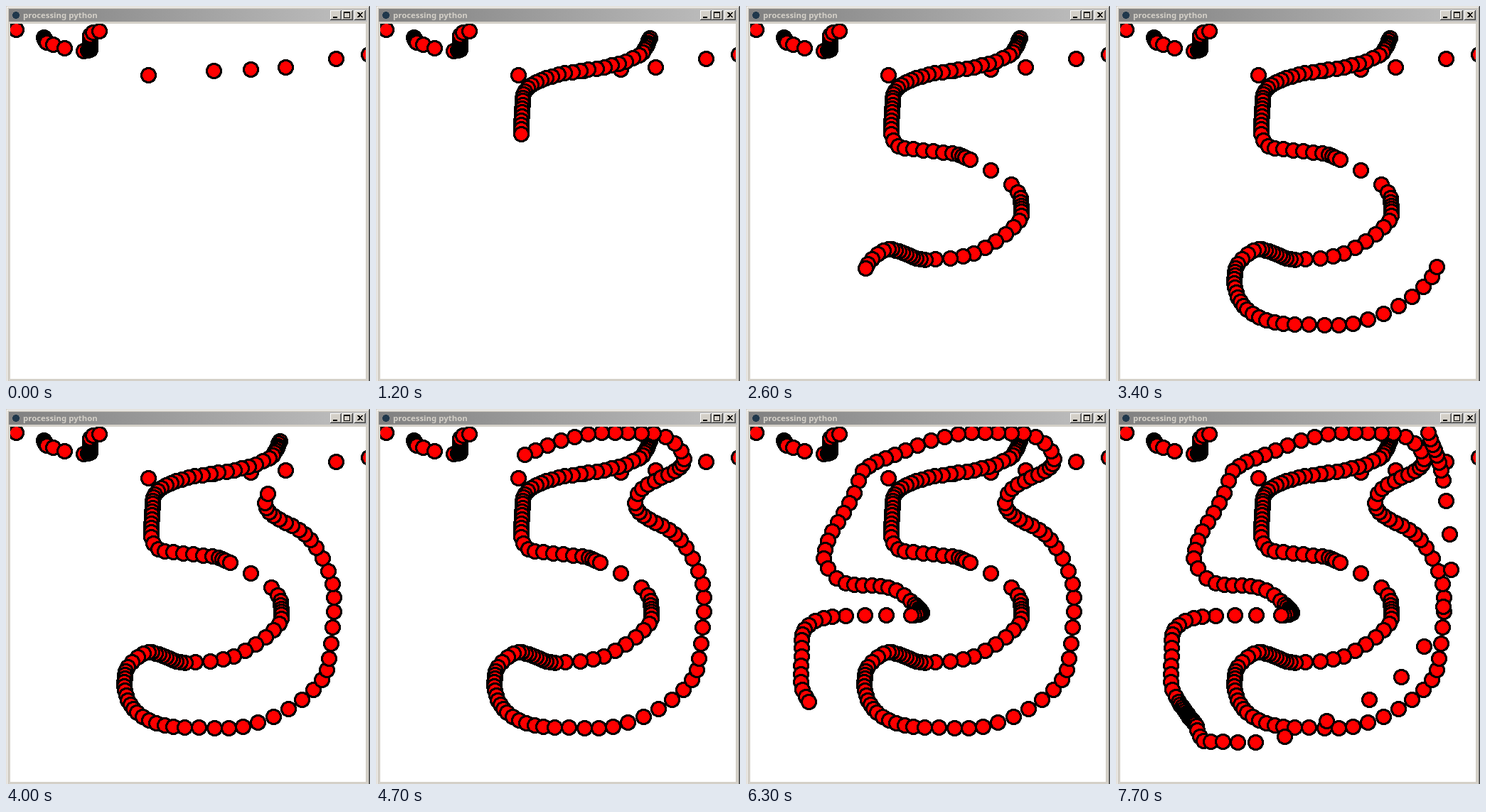
An HTML page for the animation above (7800 ms loop, 512 by 528 pixels).

```html
<!DOCTYPE html>
<html lang="en">
<head>
<meta charset="utf-8">
<title>processing python</title>
<style>
  html, body { margin: 0; width: 100%; height: 100%; overflow: hidden; background: #d4d0c8; }
  svg { display: block; shape-rendering: crispEdges; }
  #trail circle { fill: #f00; stroke: #000; stroke-width: 3; }
  text { font: bold 11.4px "Noto Sans", "Open Sans", sans-serif; fill: #d4d0c8; }
</style>
</head>
<body>
<svg width="512" height="528" viewBox="0 0 512 528">
  <defs>
    <linearGradient id="bar"><stop stop-color="#808080"/><stop offset="1" stop-color="#c0c0c0"/></linearGradient>
    <g id="button">
      <path fill="#404040" d="M0 0h16v14H0z"/>
      <path fill="#fff" d="M0 0h15v13H0z"/>
      <path fill="#808080" d="M1 1h14v12H1z"/>
      <path fill="#d4d0c8" d="M1 1h13v11H1z"/>
    </g>
  </defs>
  <path fill="#d4d0c8" d="M0 0h512v528H0z"/>
  <path fill="#fff" d="M1 1h509v1H2v526H1z"/>
  <path fill="#808080" d="M510 1h1v527h-1z"/>
  <path fill="#404040" d="M511 0h1v528h-1z"/>
  <path fill="url(#bar)" d="M4 4h504v18H4z"/>
  <circle cx="14" cy="13" r="5" fill="#20384c"/>
  <text x="24" y="17">processing python</text>
  <use href="#button" x="456" y="6"/>
  <use href="#button" x="472" y="6"/>
  <use href="#button" x="490" y="6"/>
  <path d="M460 15h6v2h-6zM475 8h9v9h-9zM476 10v6h7v-6z" fill-rule="evenodd"/>
  <path d="M494 9h2l2 2 2-2h2l-3 3.5 3 3.5h-2l-2-2-2 2h-2l3-3.5z"/>
  <svg x="6" y="25" width="500" height="500" viewBox="6 25 500 500">
    <path fill="#fff" d="M6 25h500v500H6z"/>
    <g id="trail" transform="translate(.5 .5)"></g>
  </svg>
</svg>
<script>
const LOOP = 7800, TICK = 100;
const trail = document.getElementById('trail');

// Monotone cubic through the key points [dot, x, y]: smooth, without overshoot.
function coordinate(keys, i, axis) {
  const rate = k => (keys[k + 1][axis] - keys[k][axis]) / (keys[k + 1][0] - keys[k][0]);
  const slope = k => {
    const before = rate(Math.max(k - 1, 0)), after = rate(Math.min(k, keys.length - 2));
    return before * after > 0 ? 2 * before * after / (before + after) : 0;
  };
  const k = Math.max(0, keys.findIndex(key => key[0] >= i) - 1);
  const span = keys[k + 1][0] - keys[k][0], u = (i - keys[k][0]) / span, v = 1 - u;
  return Math.round(
    v * v * (1 + 2 * u) * keys[k][axis] + u * u * (1 + 2 * v) * keys[k + 1][axis] +
    span * u * v * (v * slope(k) - u * slope(k + 1)));
}

// The pointer drops dots at a steady rate while it moves through its key points.
function stroke(start, ticks, keys) {
  const dots = [];
  for (let i = 0; i <= keys[keys.length - 1][0]; i++) {
    const dot = document.createElementNS('http://www.w3.org/2000/svg', 'circle');
    dot.setAttribute('cx', coordinate(keys, i, 1));
    dot.setAttribute('cy', coordinate(keys, i, 2));
    dot.setAttribute('r', 10);
    trail.append(dot);
    dots.push(dot);
  }
  return { start, ticks, dots };
}

const strokes = [
  stroke(0, 1, [
    [0, 14, 33], [1, 53, 44], [8, 57, 51], [10, 82, 59], [11, 109, 63], [13, 118, 61], [21, 118, 41],
    [23, 131, 35], [24, 200, 97], [25, 292, 91], [27, 393, 86], [28, 464, 74], [29, 510, 68]]),
  stroke(200, 66, [
    [0, 385, 45], [6, 375, 65], [10, 341, 81], [20, 239, 101], [26, 207, 124], [36, 204, 180],
    [38, 214, 197], [45, 299, 209], [48, 315, 216], [50, 373, 251], [52, 386, 270], [57, 387, 295],
    [64, 305, 352], [67, 252, 357], [72, 225, 349], [77, 200, 342], [82, 168, 369], [86, 166, 390],
    [91, 179, 422], [97, 235, 447], [101, 313, 449], [109, 451, 367], [114, 461, 265], [119, 428, 184],
    [128, 364, 132], [129, 368, 119], [138, 433, 70], [140, 420, 48], [142, 390, 34], [146, 317, 33],
    [152, 209, 64], [156, 164, 87], [158, 152, 118], [165, 109, 210], [168, 140, 245], [173, 200, 251],
    [177, 237, 275], [182, 247, 286], [188, 232, 290], [189, 197, 290], [192, 121, 292], [197, 79, 317],
    [203, 77, 384], [206, 88, 412], [219, 113, 446]]),
  stroke(7000, 8, [
    [0, 114, 452], [2, 123, 467], [6, 196, 469], [10, 401, 377], [13, 471, 226], [16, 460, 100], [23, 439, 33]]),
];

function draw() {
  const time = performance.now() % LOOP;
  for (const { start, ticks, dots } of strokes) {
    const done = Math.floor((time - start) / TICK) + 1;
    const shown = Math.round(dots.length * Math.min(1, Math.max(0, done / ticks)));
    dots.forEach((dot, i) => dot.setAttribute('visibility', i < shown ? 'visible' : 'hidden'));
  }
  requestAnimationFrame(draw);
}
draw();
</script>
</body>
</html>
```
